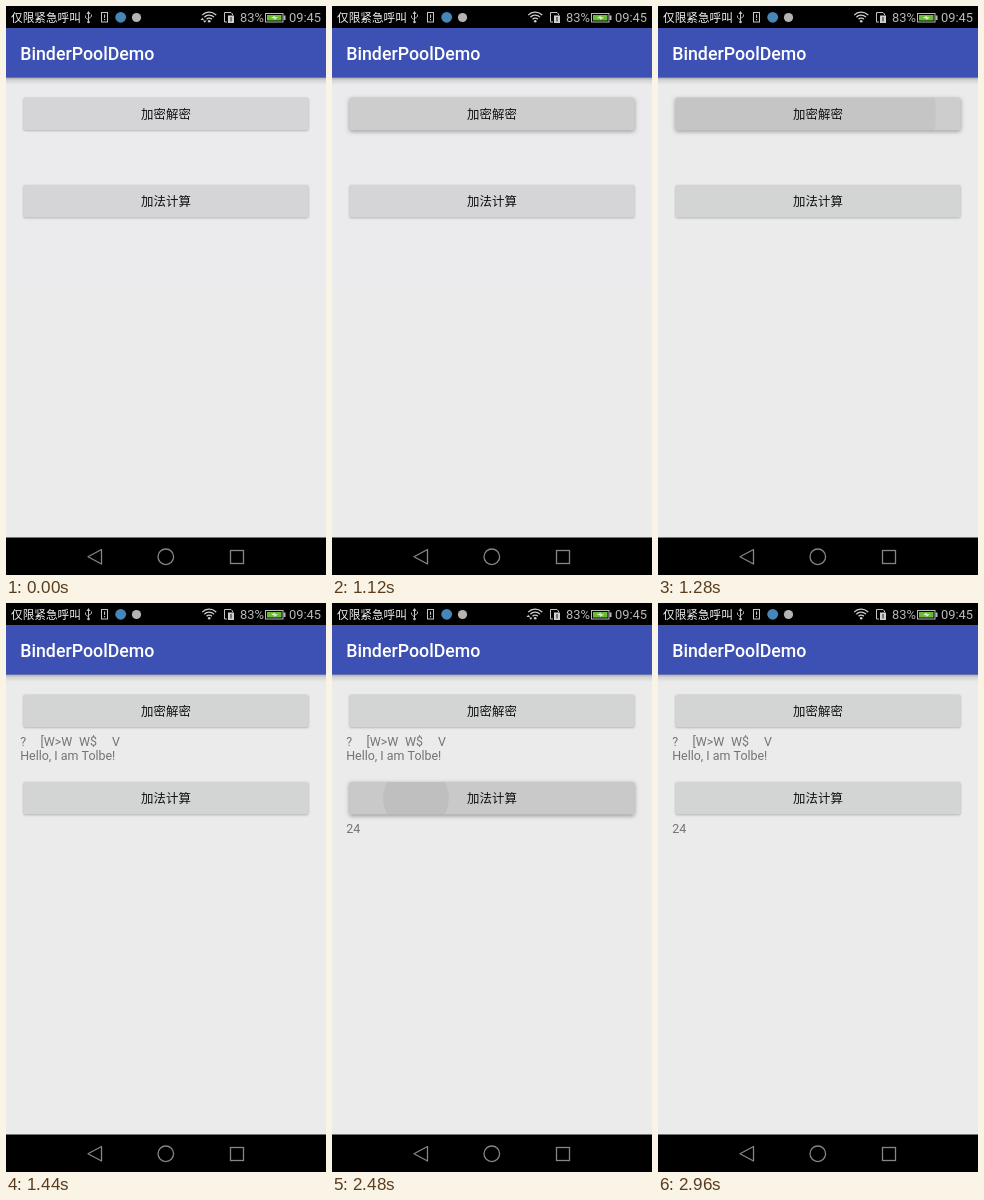
Animation, 320 px wide and 569 px high, one loop 3200 ms. Source, as an HTML page with a canvas:

```html
<!DOCTYPE html>
<html lang="zh-CN">
<head>
<meta charset="utf-8">
<title>BinderPoolDemo</title>
<style>
html, body { margin: 0; width: 100%; height: 100%; overflow: hidden; background: #ebebeb; }
canvas { display: block; width: 320px; height: 569px; }
</style>
</head>
<body>
<canvas id="stage" width="320" height="569"></canvas>
<script>
const ctx = document.getElementById('stage').getContext('2d');
const LOOP = 3200, STEP = 80;
const LATIN = 'Roboto, "Noto Sans", sans-serif';
const HAN = '"Noto Sans CJK SC", "Noto Sans CJK", sans-serif';
const clamp = v => Math.max(0, Math.min(1, v));
const gray = v => `rgb(${v},${v},${v})`;

function text(str, x, y, size, color, family = LATIN, weight = 400, align = 'left') {
  ctx.font = `${weight} ${size}px ${family}`;
  ctx.fillStyle = color;
  ctx.textAlign = align;
  ctx.fillText(str, x, y);
}

function rect(x, y, w, h, color) {
  ctx.fillStyle = color;
  ctx.fillRect(x, y, w, h);
}

function dot(x, y, r, color) {
  ctx.beginPath();
  ctx.arc(x, y, r, 0, Math.PI * 2);
  ctx.fillStyle = color;
  ctx.fill();
}

function poly(points, color, width) {
  ctx.beginPath();
  points.forEach(([x, y]) => ctx.lineTo(x, y));
  if (width) {
    ctx.strokeStyle = color;
    ctx.lineWidth = width;
    ctx.stroke();
  } else {
    ctx.fillStyle = color;
    ctx.fill();
  }
}

function frame(x, y, w, h, color, width) {
  ctx.strokeStyle = color;
  ctx.lineWidth = width;
  ctx.strokeRect(x, y, w, h);
}

function usb(x) {
  const c = '#c4c4c4';
  poly([[x, 7], [x, 16]], c, 1);
  poly([[x - 2, 8], [x, 5], [x + 2, 8]], c);
  poly([[x - 3, 9.5], [x - 3, 11.5], [x, 14]], c, 0.9);
  poly([[x + 3, 8.5], [x + 3, 10.5], [x, 12.5]], c, 0.9);
  dot(x, 16, 1.3, c);
}

function wifi(x, y, busy) {
  const c = '#cfcfcf';
  ctx.strokeStyle = c;
  ctx.lineWidth = 1.3;
  for (const r of [3.6, 6.6, 9.6]) {
    ctx.beginPath();
    ctx.arc(x, y, r, -Math.PI * 0.76, -Math.PI * 0.24);
    ctx.stroke();
  }
  dot(x, y - 0.4, 1.3, c);
  if (busy) {
    poly([[194.5, 14], [196.3, 11.8], [198, 14]], c);
    poly([[197, 14.5], [200.5, 14.5], [198.8, 16.8]], c);
  }
}

function statusBar(busy) {
  rect(0, 0, 320, 22, '#000');
  text('仅限紧急呼叫', 5, 16.3, 11.65, '#f0f0f0', HAN);
  usb(82.5);
  frame(95.5, 6.5, 6, 9.5, '#c4c4c4', 1);
  rect(98, 8.5, 1.1, 3.4, '#c4c4c4');
  rect(98, 13, 1.1, 1.2, '#c4c4c4');
  dot(114.7, 11.3, 5.4, '#4786b8');
  dot(130.5, 11.5, 4.6, '#b4b4b4');
  wifi(203.2, 15.7, busy);

  poly([[221, 16], [218.5, 16], [218.5, 6.5], [225, 6.5], [226.5, 8], [226.5, 9]], '#c4c4c4', 1);
  rect(222, 9.5, 6, 7.5, '#d0d0d0');
  rect(224.5, 11, 1, 4.5, '#222');

  text('83%', 234, 16.4, 12.9, '#b9b9b9');
  frame(259.5, 7.5, 17.5, 8.5, '#b9b9b9', 1);
  rect(261, 9, 14.5, 5.5, '#69bd35');
  rect(277.5, 9.5, 2, 4.5, '#b9b9b9');
  poly([[265, 12], [269, 9.6], [268.5, 11.3], [272, 11.3], [268, 14], [268.4, 12.3]], '#e6f2dc');
  text('09:45', 283, 16.4, 12.9, '#b9b9b9');
}

function titleBar() {
  const g = ctx.createLinearGradient(0, 71, 0, 79);
  g.addColorStop(0, 'rgba(0,0,0,.3)');
  g.addColorStop(0.4, 'rgba(0,0,0,.1)');
  g.addColorStop(1, 'rgba(0,0,0,0)');
  rect(0, 71, 320, 8, g);
  rect(0, 22, 320, 49.6, '#3d50b3');
  text('BinderPoolDemo', 14.2, 54, 17.78, '#fff', LATIN, 500);
}

function navBar() {
  rect(0, 531.5, 320, 37.5, '#000');
  const c = '#858585';
  ctx.lineJoin = 'round';
  poly([[95.5, 543.5], [95.5, 558], [82, 550.8], [95.5, 543.5], [95.5, 545]], c, 1.3);
  ctx.lineJoin = 'miter';
  ctx.beginPath();
  ctx.arc(159.8, 550.8, 7.8, 0, Math.PI * 2);
  ctx.stroke();
  frame(224.5, 544.5, 13, 13, c, 1.3);
}

// age: ms since the button was touched
function button(label, y, rest, age) {
  const held = age >= 0 && age < 480;
  let face = rest;
  if (held) face = gray(age < 200 ? 205 : age < 300 ? 201 : age < 380 ? 205 : 209);

  ctx.beginPath();
  ctx.roundRect(17.4, y, 285.2, 32.6, 1.8);
  ctx.save();
  ctx.shadowColor = held ? 'rgba(0,0,0,.36)' : 'rgba(0,0,0,.25)';
  ctx.shadowBlur = held ? 4 : 2;
  ctx.shadowOffsetY = held ? 1.4 : 0.7;
  ctx.fillStyle = face;
  ctx.fill();
  ctx.restore();

  const grow = (age - 213) / 123;
  if (held && grow > 0) {
    ctx.save();
    ctx.clip();
    const p = Math.min(grow, 1.15);
    const fade = clamp((560 - age) / 320);
    dot(62.6 + 97.4 * Math.min(p, 1), y + 16.3, 150 * p, `rgba(0,0,0,${0.05 * fade})`);
    ctx.restore();
  }
  text(label, 160, y + 21.2, 12.44, '#101010', HAN, 400, 'center');
}

function draw(t) {
  const early = t < 1200;
  const rest = early ? '#d5d5d7' : '#d2d5d4';
  rect(0, 0, 320, 569, '#ebebeb');
  if (early) rect(0, 72, 320, 212, '#ebebed');

  titleBar();
  statusBar(t < 80 || (t >= 2400 && t < 2960));
  button('加密解密', 91.6, rest, t - 960);
  button('加法计算', 178.9, rest, t - 2240);

  const ink = '#747474';
  if (t >= 1360) {
    [['?', 14.2], ['[W>W', 34.5], ['W$', 73], ['V', 106]]
      .forEach(([s, x]) => text(s, x, 142.6, 12.44, ink));
    text('Hello, I am Tolbe!', 14.2, 157.2, 12.44, ink);
  }
  if (t >= 2400) text('24', 14.2, 229.6, 12.44, ink);
  navBar();
}

const start = performance.now();
function tick() {
  const t = (performance.now() - start) % LOOP;
  draw(Math.floor(t / STEP) * STEP);
  requestAnimationFrame(tick);
}
tick();
</script>
</body>
</html>
```
